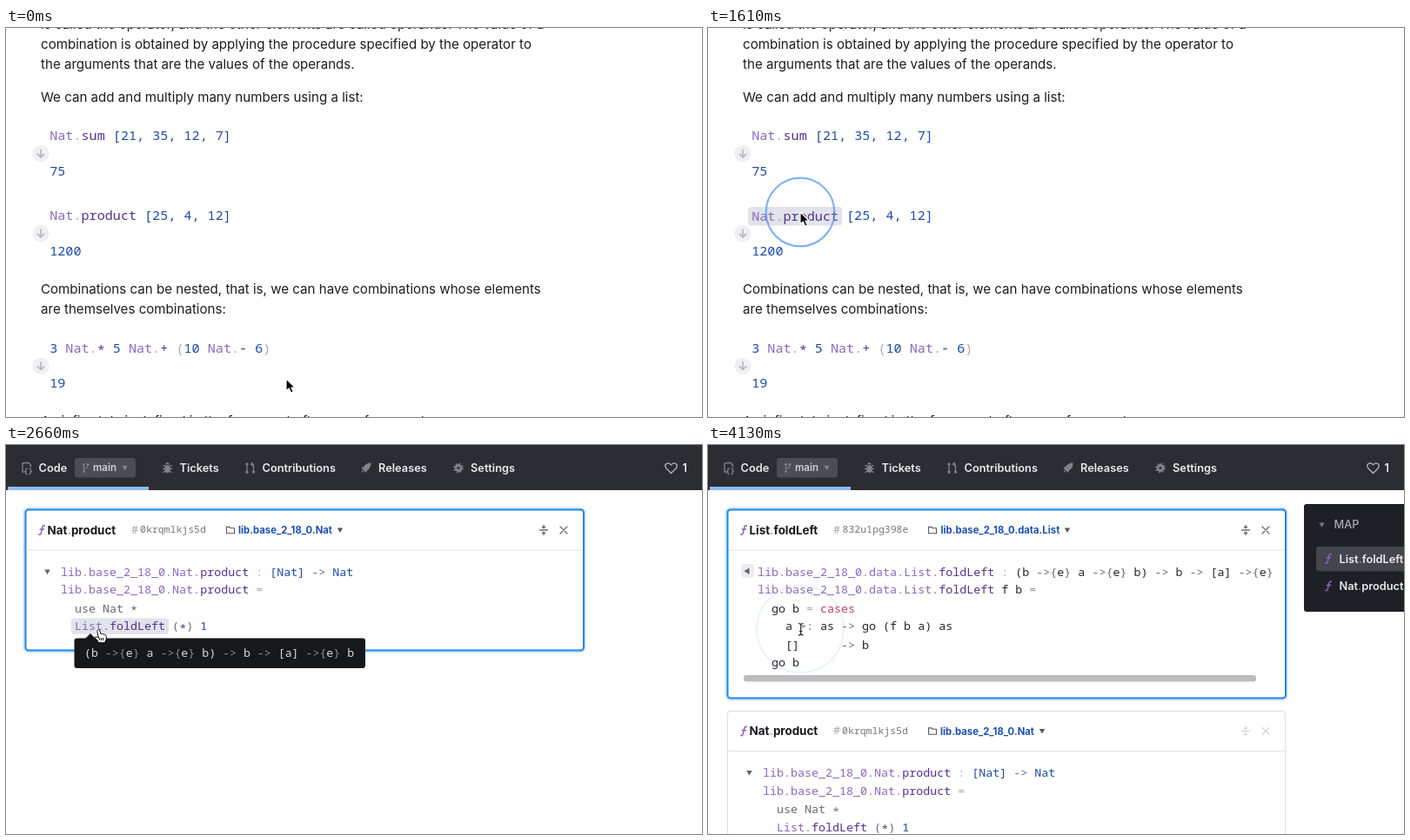
An HTML page for the animation above (4200 ms loop, 800 by 448 pixels).

```html
<!DOCTYPE html>
<html lang="en">
<head>
<meta charset="utf-8">
<title>Browsing code definitions</title>
<style>
html, body { margin: 0; width: 100%; height: 100%; overflow: hidden; background: #fff; }
svg { display: block; width: 800px; height: 448px; }
text { white-space: pre; font-optical-sizing: none; }

.prose { font: 15.11px Inter, sans-serif; fill: #1c1c1f; }
.repl { font: 15.13px "Noto Sans Mono", monospace; fill: #1f4aa5; }
.code { font: 13.35px "Noto Sans Mono", monospace; fill: #25262b; }
.hash { font: 11.5px "Noto Sans Mono", monospace; fill: #74757c; }
.tab { font: 600 12.8px Inter, sans-serif; fill: #e8e9ec; }
.title { font: 700 13.4px Inter, sans-serif; fill: #18181b; }
.path { font: 700 11.3px Inter, sans-serif; fill: #1c4fad; }
.branch { font-size: 11.5px; fill: #d0d1d6; }
.sharp { font-size: 13.4px; }
.l { fill: #8a69bd; }
.d { fill: #55318d; }
.b { fill: #1f4aa5; }
.g { fill: #8c8d94; }
.p { fill: #a8a8b1; }
.u { fill: #696a70; }
.r { fill: #b8455c; }
.line { fill: none; stroke: currentColor; stroke-width: 1.3; stroke-linecap: round; stroke-linejoin: round; }
.mark { fill: #e1e3ea; }

.scene, .mark, .tip, .cursor, .pointer, .ripple { animation: 4.2s infinite step-end; }
.a { animation-name: a; }
.bb { animation-name: bb; }
.c { animation-name: c; }
.mark1 { animation-name: mark1; }
.mark2 { animation-name: mark2; }
.press { animation: press 4.2s infinite step-end; }
.tip { animation-name: tip; animation-timing-function: linear; }
.cursor { animation-name: move; }
.arrow { animation-name: arrow; }
.hand { animation-name: hand; }
.ibeam { animation-name: c; }
.ripple {
  fill: none; stroke: #4a93e6; stroke-width: 2; vector-effect: non-scaling-stroke;
  animation-name: grow, fade;
}

@keyframes a { 0% { opacity: 1 } 40%, 100% { opacity: 0 } }
@keyframes bb { 0% { opacity: 0 } 40% { opacity: 1 } 96.6%, 100% { opacity: 0 } }
@keyframes c { 0% { opacity: 0 } 96.6%, 100% { opacity: 1 } }
@keyframes mark1 { 0% { opacity: 0 } 18.3%, 100% { opacity: 1 } }
@keyframes mark2 { 0% { opacity: 0 } 42.8%, 100% { opacity: 1 } }
@keyframes press { 0% { transform: none } 35%, 100% { transform: translateY(1px) } }
@keyframes tip { 0%, 47.6% { opacity: 0 } 51%, 100% { opacity: 1 } }
@keyframes move {
  0% { transform: translate(322px, 404px) }
  1.7% { transform: translate(322px, 404px); animation-timing-function: cubic-bezier(.42, 0, .4, 1) }
  21%, 100% { transform: translate(106px, 212px) }
}
@keyframes arrow {
  0% { opacity: 1 } 18.3% { opacity: 0 } 36.6% { opacity: 1 }
  42.8% { opacity: 0 } 93% { opacity: 1 } 96.6%, 100% { opacity: 0 }
}
@keyframes hand {
  0% { opacity: 0 } 18.3% { opacity: 1 } 36.6% { opacity: 0 }
  42.8% { opacity: 1 } 93%, 100% { opacity: 0 }
}
@keyframes grow {
  0% { transform: scale(0) }
  35% { transform: scale(0); animation-timing-function: cubic-bezier(.33, 1, .68, 1) }
  43.3% { transform: scale(1) }
  90.7% { transform: scale(0); animation-timing-function: cubic-bezier(.33, 1, .68, 1) }
  99%, 100% { transform: scale(1) }
}
@keyframes fade {
  0% { opacity: 0 }
  35% { opacity: 1; animation-timing-function: ease-in }
  43.3% { opacity: 0 }
  90.7% { opacity: 1; animation-timing-function: ease-in }
  99%, 100% { opacity: 0 }
}
</style>
</head>
<body>
<svg viewBox="0 0 800 448">
  <defs>
    <g id="down">
      <circle r="9.7" fill="#f0f0f2"/>
      <path class="line" d="M0-4.5V4M-3.7.5 0 4.2 3.7.5" color="#b4b4b9" style="stroke-width:1.6"/>
    </g>
    <path id="fn" class="line" color="#8a5fc0" style="stroke-width:1.5" d="M-3.2 5q2 .7 2.5-1.7L.8-3.3Q1.3-5.6 3.3-5M-1.7-1H2.6"/>
    <path id="caret" d="M-3.2-2.5H3.2L0 3z"/>
    <path id="folder" class="line" color="#55565d" style="stroke-width:1.1" d="M-4.5 3.7V-3.6H-1L.2-2.2H4.5V3.7Z"/>
    <g id="tools">
      <path class="line" d="M-4.5 0H4.5M0-5.5V-2.5M0 2.5V5.5M-1.7-3.7 0-2.2 1.7-3.7M-1.7 3.7 0 2.2 1.7 3.7"/>
      <path class="line" d="M19-4 27 4M27-4 19 4"/>
    </g>
    <g id="top">
      <rect width="800" height="52" fill="#2c2d33"/>
      <rect x="2" y="48" width="162" height="4" fill="#8dbbf5"/>
      <rect x="79" y="15" width="70" height="22.5" rx="3" fill="#4b4c54"/>
      <g color="#80818a" fill="#80818a">
        <path class="line" d="M21 21H19V31H21M22 20.5H26L28.5 23V25M24 27Q22.5 27 22.8 29T21.5 30.5Q23 30.5 22.8 32T24 33.5M27 27Q28.5 27 28.2 29T29.5 30.5Q28 30.5 28.2 32T27 33.5"/>
        <path class="line" style="stroke-width:1.1" d="M89.5 23V30M94 23.5Q94 27 89.5 27"/>
        <circle cx="89.5" cy="22.3" r="1.4"/><circle cx="89.5" cy="30.6" r="1.4"/><circle cx="94" cy="22.3" r="1.4"/>
        <use href="#caret" x="136.5" y="26.3"/>
        <ellipse cx="185.5" cy="27.5" rx="3" ry="4.5"/>
        <path class="line" d="M181 23.5 183 25M190 23.5 188 25M180.5 27.5H190.5M181 31.5 183 30M190 31.5 188 30M184 22Q185.5 20 187 22"/>
        <path class="line" d="M277 23V32M284.5 30V24Q284.5 22 282 22M283.3 20.5 281.5 22 283.3 23.5"/>
        <circle cx="277" cy="22" r="1.6"/><circle cx="277" cy="31" r="1.6"/><circle cx="284.5" cy="31" r="1.6"/>
        <path d="M419.5 20.5Q420 26 415 29.5L414 32 411.8 30 410 28.2 408.5 26 411 25Q414 20.5 419.5 20.5ZM411 29.5 410 31.5 408.8 31.5 409.5 29Z"/>
        <circle class="line" cx="520" cy="26.5" r="3" style="stroke-width:2.8"/>
        <circle class="line" cx="520" cy="26.5" r="5" style="stroke-width:1.6;stroke-linecap:butt" stroke-dasharray="1.96"/>
      </g>
      <path class="line" color="#b4b5bb" d="M764.5 32.5 759 27Q756.5 23.5 759 21.5 762.3 19.6 764.5 23 766.7 19.6 770 21.5 772.5 23.5 770 27Z"/>
      <g class="tab">
        <text x="37.5" y="31">Code</text>
        <text class="branch" x="100" y="30.3">main</text>
        <text x="199.5" y="31">Tickets</text>
        <text x="294.5" y="31">Contributions</text>
        <text x="428" y="31">Releases</text>
        <text x="534" y="31">Settings</text>
        <text x="777.5" y="31">1</text>
      </g>
    </g>
    <g id="product">
      <use href="#fn" x="41" y="98"/>
      <text class="title" x="47.5" y="102.7">Nat<tspan class="p">.</tspan>product</text>
      <text class="hash" x="144" y="101.5"><tspan class="p sharp">#</tspan></text>
      <text class="hash" x="154" y="101.3">0krqmlkjs5d</text>
      <use href="#folder" x="258" y="98"/>
      <text class="path" x="267" y="102">lib.base_2_18_0.Nat</text>
      <use href="#caret" x="384" y="98" fill="#55565d"/>
      <path d="M23 121H663" stroke="#e2e2e6"/>
      <use href="#caret" x="47.5" y="146" fill="#606168"/>
      <g class="code">
        <text x="63" y="150.5"><tspan class="l">lib.base_2_18_0.Nat.</tspan><tspan class="d">product</tspan><tspan class="p"> : </tspan><tspan class="b">[Nat] <tspan class="u">-&gt;</tspan> Nat</tspan></text>
        <text x="63" y="171.3"><tspan class="l">lib.base_2_18_0.Nat.</tspan><tspan class="d">product</tspan><tspan class="p"> =</tspan></text>
        <text x="79" y="192.5" class="u">use Nat <tspan dy="2.5">*</tspan></text>
        <text x="79" y="213.3"><tspan class="l">List.</tspan><tspan class="d">foldLeft</tspan><tspan class="u"> (</tspan><tspan class="d" dy="2.5">*</tspan><tspan class="u" dy="-2.5">)</tspan><tspan class="b"> 1</tspan></text>
      </g>
    </g>
    <clipPath id="pane"><rect x="36" y="122" width="612" height="160"/></clipPath>
  </defs>

  <rect width="800" height="448" fill="#fff"/>

  <g class="scene a">
    <g class="prose">
      <text x="40" y="1.3">is called the operator, and the other elements are called operands. The value of a</text>
      <text x="40" y="24.3">combination is obtained by applying the procedure specified by the operator to</text>
      <text x="40" y="47">the arguments that are the values of the operands.</text>
      <text x="40" y="84.7">We can add and multiply many numbers using a list:</text>
      <text x="40" y="306">Combinations can be nested, that is, we can have combinations whose elements</text>
      <text x="40" y="328.7">are themselves combinations:</text>
      <text x="40" y="458.3">An infix style is defined in the form most often seen for operators</text>
    </g>
    <rect class="mark mark1" x="46" y="206" width="108" height="21.5" rx="4"/>
    <g class="repl">
      <text x="50.2" y="129"><tspan class="l">Nat</tspan><tspan class="p">.</tspan><tspan class="d">sum</tspan> [21, 35, 12, 7]</text>
      <text x="50.2" y="170">75</text>
      <text class="press" x="50.2" y="221.2"><tspan class="l">Nat</tspan><tspan class="p">.</tspan><tspan class="d">product</tspan></text>
      <text x="159" y="221.2">[25, 4, 12]</text>
      <text x="50.2" y="262.2">1200</text>
      <text x="50.2" y="373.5">3 <tspan class="l">Nat</tspan><tspan class="p">.</tspan><tspan class="d" dy="2.8">*</tspan><tspan dy="-2.8"> 5 </tspan><tspan class="l">Nat</tspan><tspan class="p">.</tspan><tspan class="d">+</tspan> <tspan class="p">(</tspan>10 <tspan class="l">Nat</tspan><tspan class="p">.</tspan><tspan class="d">-</tspan> 6<tspan class="p">)</tspan></text>
      <text x="50.2" y="414.3">19</text>
    </g>
    <use href="#down" x="40" y="144.7"/>
    <use href="#down" x="40" y="236.8"/>
    <use href="#down" x="40" y="389.2"/>
  </g>

  <g class="scene bb">
    <use href="#top"/>
    <rect x="21" y="73" width="644" height="165" rx="5" fill="none" stroke="#cfe3fa" stroke-width="3"/>
    <rect x="22.5" y="74.5" width="641.5" height="162" rx="3.5" fill="#fff" stroke="#1f86ea" stroke-width="2"/>
    <rect class="mark mark2" x="75" y="199.5" width="112" height="18.5" rx="4"/>
    <use href="#product"/>
    <use href="#tools" x="618" y="98" color="#6c6d74"/>
    <g class="tip">
      <path d="M91 223 97 217 103 223Z" fill="#17181c"/>
      <rect x="78.5" y="222.5" width="334.5" height="34.5" rx="3" fill="#17181c"/>
      <text class="code" x="90" y="244" style="font-size:13.25px;fill:#d9dade">(b <tspan class="g">-&gt;{</tspan>e<tspan class="g">}</tspan> a <tspan class="g">-&gt;{</tspan>e<tspan class="g">}</tspan> b) <tspan class="g">-&gt;</tspan> b <tspan class="g">-&gt;</tspan> [a] <tspan class="g">-&gt;{</tspan>e<tspan class="g">}</tspan> b</text>
    </g>
  </g>

  <g class="scene c">
    <use href="#top"/>
    <rect x="21" y="73" width="644" height="220" rx="5" fill="none" stroke="#cfe3fa" stroke-width="3"/>
    <rect x="22.5" y="74.5" width="641.5" height="217" rx="3.5" fill="#fff" stroke="#1f86ea" stroke-width="2"/>
    <use href="#fn" x="41" y="98"/>
    <text class="title" x="47.5" y="102.7">List<tspan class="p">.</tspan>foldLeft</text>
    <text class="hash" x="144" y="101.5"><tspan class="p sharp">#</tspan></text>
    <text class="hash" x="154.5" y="101.3">832u1pg398e</text>
    <use href="#folder" x="258" y="98"/>
    <text class="path" x="267.5" y="102">lib.base_2_18_0.data.List</text>
    <use href="#caret" x="413" y="98" fill="#55565d"/>
    <use href="#tools" x="618" y="98" color="#6c6d74"/>
    <path d="M24 121H663" stroke="#e2e2e6"/>
    <rect x="38" y="137" width="15" height="16" rx="4" fill="#ececee"/>
    <path d="M47.5 141.5V149L41.5 145.3Z" fill="#606168"/>
    <g class="code" clip-path="url(#pane)">
      <text x="57" y="150.5"><tspan class="l">lib.base_2_18_0.data.List.</tspan><tspan class="d">foldLeft</tspan><tspan class="p"> : </tspan>(b <tspan class="u">-&gt;{</tspan>e<tspan class="u">}</tspan> a <tspan class="u">-&gt;{</tspan>e<tspan class="u">}</tspan> b) <tspan class="u">-&gt;</tspan> b <tspan class="u">-&gt;</tspan> [a] <tspan class="u">-&gt;{</tspan>e<tspan class="u">}</tspan></text>
      <text x="57" y="171.3"><tspan class="l">lib.base_2_18_0.data.List.</tspan><tspan class="d">foldLeft</tspan> f b <tspan class="g">=</tspan></text>
      <text x="73" y="192.5">go b <tspan class="p">=</tspan> <tspan class="r">cases</tspan></text>
      <text x="89" y="213.3">a <tspan class="u">+:</tspan> as <tspan class="u">-&gt;</tspan> go (f b a) as</text>
      <text x="89" y="234.5">[]      <tspan class="u">-&gt;</tspan> b</text>
      <text x="73" y="255.3">go b</text>
    </g>
    <rect x="41" y="265" width="589" height="7.5" rx="3" fill="#bcbcbe"/>

    <path d="M22.5 460V310Q22.5 306.5 26 306.5H660Q663.5 306.5 663.5 310V460" fill="#fff" stroke="#dcdde2"/>
    <use href="#product" y="231.5"/>
    <use href="#tools" x="618" y="329.5" color="#d9d9dd"/>

    <rect x="685" y="68" width="125" height="124" rx="3" fill="#1f2026"/>
    <rect x="699" y="117" width="111" height="28.5" rx="4" fill="#44454d"/>
    <use href="#caret" x="705.5" y="92" fill="#70717a"/>
    <text class="tab" x="719.5" y="96" style="font-weight:500;fill:#a9aab1">MAP</text>
    <use href="#fn" x="713" y="131"/>
    <use href="#fn" x="713" y="162.5"/>
    <text class="tab" x="725.5" y="135.5">List<tspan class="g">.</tspan>foldLeft</text>
    <text class="tab" x="725.5" y="167">Nat<tspan class="g">.</tspan>product</text>
  </g>

  <g transform="translate(106 212)"><circle class="ripple" r="50"/></g>

  <g class="cursor">
    <path class="pointer arrow" d="M0 0V14L3.3 11 5.6 16.3 8.3 15.1 6 10H10.3Z" fill="#000" stroke="#fff" stroke-width="1.2" stroke-linejoin="round"/>
    <path class="pointer hand" d="M-.8 1.5Q.7-.4 1.7 1.6L3 5.7Q4.5 4.6 5.4 6 7 5.2 7.5 6.9 9.3 6.6 9.5 8.8 9.8 12 7.5 15.7H.7Q-1 12.5-3.3 10.6-4.2 8.7-2 8.9L.5 10.2-1 3.5Q-1.3 2.2-.8 1.5ZM3.5 10.2V13M5.5 10V13M1.6 10.2V13" fill="#fff" stroke="#111" stroke-linejoin="round"/>
    <g class="pointer ibeam" fill="none">
      <path id="beam" d="M-2.2-6.5Q.7-6.5.7-4.5V5Q.7 7-2.2 7M3.6-6.5Q.7-6.5.7-4.5M.7 5Q.7 7 3.6 7M-1 2.5H2.4" stroke="#fff" stroke-width="3"/>
      <path d="M-2.2-6.5Q.7-6.5.7-4.5V5Q.7 7-2.2 7M3.6-6.5Q.7-6.5.7-4.5M.7 5Q.7 7 3.6 7M-1 2.5H2.4" stroke="#222" stroke-width="1.2"/>
    </g>
  </g>
</svg>
</body>
</html>
```
